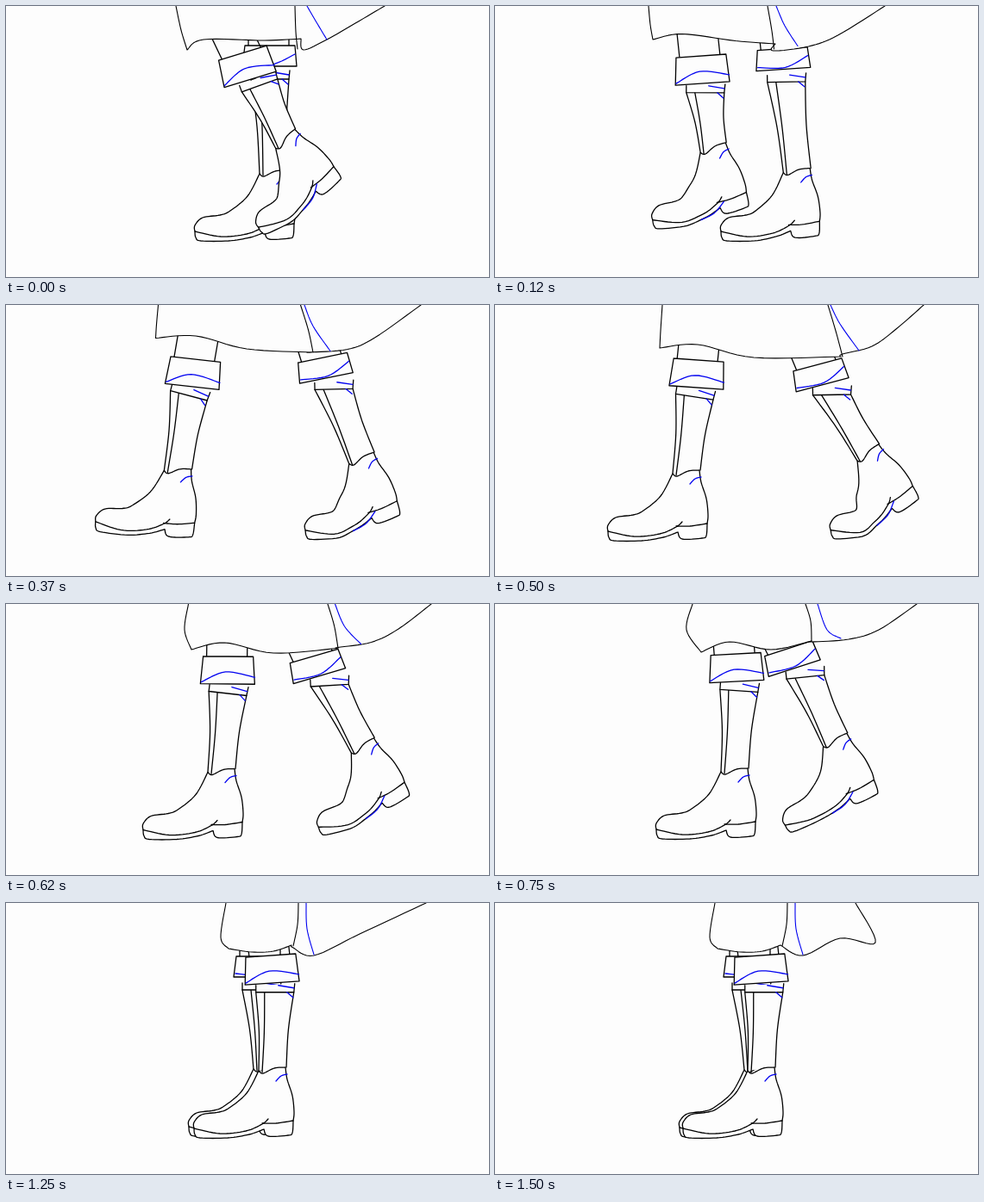
Recreate the animation shown at these times as an HTML page with a canvas. Size 560x315 px, loop 1.62 s.

```html
<!DOCTYPE html>
<html lang="en">
<head>
<meta charset="utf-8">
<title>Walk to a halt</title>
<style>
html, body { margin: 0; overflow: hidden; background: #fdfdfd; }
canvas { display: block; }
</style>
</head>
<body>
<canvas id="stage" width="560" height="315"></canvas>
<script>
const ctx = document.getElementById('stage').getContext('2d');
const PAPER = '#fdfdfd', INK = '#000', BLUE = '#0000f0';
const LOOP = 1620, STEP = 125;

const mix = (a, b, k) => typeof a === 'number'
  ? a + (b - a) * k
  : Array.isArray(a)
    ? a.map((v, i) => mix(v, b[i], k))
    : Object.fromEntries(Object.keys(a).map(key => [key, mix(a[key], b[key], k)]));

function rotate([x, y], degrees) {
  const r = degrees * Math.PI / 180, c = Math.cos(r), s = Math.sin(r);
  return [x * c - y * s, x * s + y * c];
}

// Places local points: turned about their origin, then moved to (x, y).
const place = (x, y, degrees) => p => {
  const [u, v] = rotate(p, degrees);
  return [x + u, y + v];
};

// "x,y x,y! ..." to points; "!" doubles a point, which makes it a corner.
const points = text => text.split(' ').flatMap(word => {
  const p = word.replace('!', '').split(',').map(Number);
  return word.endsWith('!') ? [p, p] : [p];
});

// Catmull-Rom curve as a fine polyline.
function curve(pts) {
  const at = i => pts[Math.max(0, Math.min(pts.length - 1, i))];
  const out = [pts[0]];
  for (let i = 0; i < pts.length - 1; i++) {
    const [a, b, c, d] = [at(i - 1), at(i), at(i + 1), at(i + 2)];
    if (Math.hypot(c[0] - b[0], c[1] - b[1]) < 0.01) continue;
    for (let u = 0.125; u <= 1; u += 0.125) {
      out.push([0, 1].map(n => b[n] + u / 2 * (c[n] - a[n] +
        u * (2 * a[n] - 5 * b[n] + 4 * c[n] - d[n] +
        u * (3 * (b[n] - c[n]) + d[n] - a[n])))));
    }
  }
  return out;
}
const shape = text => curve(points(text));

// One boot, standing flat, with the ball of the foot at the origin.
const boot = {
  outline: shape('-35,-9 -35,-16 -26,-25 -6,-28 6,-33 26,-50 40,-76! 45,-73 58,-79 71,-80! 73,-66 79,-47 81,-28 80,-18! 79,-4 74,-1 51,0 46,-8! 29,-2 4,2 -28,2 -34,-2 -35,-9'),
  sole: shape('-35,-9 -5,-3 25,-6 44,-14 51,-20'),
  heel: shape('44,-15 60,-15 80,-18'),
  fold: shape('60,-64 66,-70 73,-72'),
  arch: shape('21,0 38,-4 52,-14'),
  topFront: [40, -76],
  topBack: [72, -80]
};

// Key poses. foot: ball x, y, toe angle, heel angle. cuff: centre x, y, tilt, shin-top tilt.
const halt = {
  a: { foot: [253, 271, 0, 0], cuff: [308, 77, -4, 0] },
  b: { foot: [247, 269, 0, 0], cuff: [296, 74, 0, 0] },
  body: points('255,0 249,40 258,53! 285,57 310,56 331,49!'),
  tail: points('333,52 357,61 410,36 487,0'),
  slit: points('339,0 338,25 333,50'),
  lining: points('348,0 349,30 357,60')
};
const poses = [
  {
    a: { foot: [328, 250, -26, -38], cuff: [279, 70, -17, -20] },
    b: { foot: [254, 271, 0, 0], cuff: [306, 58, 0, 0] },
    body: points('197,0 203,28 210,51! 229,39 300,40 342,38!'),
    tail: points('345,51 372,39 405,20 439,0'),
    slit: points('335,0 336,30 338,50'),
    lining: points('349,0 360,19 372,39')
  },
  {
    a: { foot: [109, 258, 14, 9], cuff: [201, 78, 9, 21] },
    b: { foot: [340, 271, 0, -4], cuff: [362, 65, -8, -2] },
    body: points('159,0 157,15 156,27! 205,26 258,41 308,50!'),
    tail: points('300,53 355,55 390,48 465,0'),
    slit: points('297,0 306,28 309,50'),
    lining: points('303,0 312,27 330,54')
  },
  {
    a: { foot: [166, 272, 0, 0], cuff: [235, 80, 4, 9] },
    b: { foot: [425, 267, -6, -31], cuff: [377, 81, -15, -1] },
    body: points('194,0 192,30 191,50! 235,46 300,61 401,60!'),
    tail: points('403,57 437,48 465,28 497,0'),
    slit: points('386,0 395,30 403,60'),
    lining: points('389,0 400,22 422,53')
  },
  {
    a: { foot: [222, 271, 0, 0], cuff: [280, 74, -3, 4] },
    b: { foot: [372, 251, -24, -22], cuff: [344, 63, -18, -6] },
    body: points('229,0 222,30 239,56! 272,44 320,53 367,43!'),
    tail: points('367,44 410,41 445,30 489,0'),
    slit: points('360,0 366,20 367,43'),
    lining: points('374,0 385,30 401,40')
  },
  {
    a: halt.a,
    b: { foot: [307, 269, -8, -12], cuff: [314, 75, -6, 0] },
    body: points('267,0 261,40 270,54! 295,57 320,53 344,48!'),
    tail: points('338,56 375,54 415,33 463,0'),
    slit: points('351,0 349,30 344,48'),
    lining: points('370,0 380,30 404,39')
  },
  halt,
  {
    ...halt,
    b: { foot: [249, 270, 0, 0], cuff: [297, 74, 0, 0] },
    tail: points('357,61 400,41 441,46 418,0')
  }
];

// Each leg has its own cuff height and blue stripe.
const styles = {
  a: { half: 16, stripe: shape('-31,14 -3,2 31,8') },
  b: { half: 12, stripe: shape('-30,8 2,10 29,-2') }
};

function draw(line, color = INK, filled = false) {
  ctx.beginPath();
  line.forEach(p => ctx.lineTo(...p));
  ctx.strokeStyle = color;
  if (filled) ctx.fill();
  ctx.stroke();
}

// The sole flexes at the ball: points turn from the toe angle to the heel angle.
const flex = ([x, y, toe, heel]) => p => {
  const k = Math.max(0, Math.min(1, (p[0] + 10) / 30));
  return place(x, y, mix(toe, heel, k * k * (3 - 2 * k)))(p);
};

function drawLeg({ foot, cuff: [x, y, tilt, shinTilt] }, { half, stripe }) {
  const inBoot = flex(foot);
  const inCuff = place(x, y, tilt);
  const inShin = place(...place(x, y, tilt * 2)([0, 27]), shinTilt);
  const front = inBoot(boot.topFront), back = inBoot(boot.topBack);
  const bowed = (from, to, bow) => {
    const [mx, my] = mix(from, to, 0.5);
    return curve([from, [mx + bow, my], to]);
  };

  const shinFront = bowed(inShin([-22, 0]), front, 2);
  const shinBack = bowed(inShin([22, 0]), back, -2);
  ctx.beginPath();
  [...shinFront, ...[...shinBack].reverse()].forEach(p => ctx.lineTo(...p));
  ctx.fill();
  draw(shinFront);
  draw(shinBack);
  draw(bowed(inShin([-12, 0]), [front[0] + 4, front[1] + 2], 1));

  draw(boot.outline.map(inBoot), INK, true);
  draw(boot.sole.map(inBoot));
  draw(boot.heel.map(inBoot));
  draw(boot.fold.map(inBoot), BLUE);
  if (foot[3] < -2) draw(boot.arch.map(inBoot), BLUE);

  draw([[-22, -8], [-22, 0], [22, 0], [23, -10]].map(inShin), INK, true);
  draw([[4, -8], [22, -5]].map(inShin), BLUE);
  draw([[14, 0], [21, 6]].map(inShin), BLUE);

  const [thighX, thighY] = rotate([0, -45], tilt * 1.5);
  for (const side of [-25, 22]) {
    const [px, py] = inCuff([side, -half]);
    draw([[px, py], [px + thighX, py + thighY]]);
  }
  draw([[-29, -half], [29, -half], [31, half], [-32, half], [-29, -half]].map(inCuff), INK, true);
  draw(stripe.map(inCuff), BLUE);
}

function frame(now) {
  const step = Math.min(12, Math.floor((now % LOOP + 5) / STEP));
  const pose = mix(poses[Math.floor(step / 2)], poses[Math.ceil(step / 2)], step % 2 / 2);
  ctx.fillStyle = PAPER;
  ctx.fillRect(0, 0, 560, 315);
  ctx.lineJoin = ctx.lineCap = 'round';
  ctx.lineWidth = 1.3;
  drawLeg(pose.b, styles.b);
  drawLeg(pose.a, styles.a);
  ctx.lineWidth = 1.1;
  draw(curve([...pose.body, ...pose.tail]), INK, true);
  draw(curve(pose.slit));
  draw(curve(pose.lining), BLUE);
  requestAnimationFrame(frame);
}
requestAnimationFrame(frame);
</script>
</body>
</html>
```
